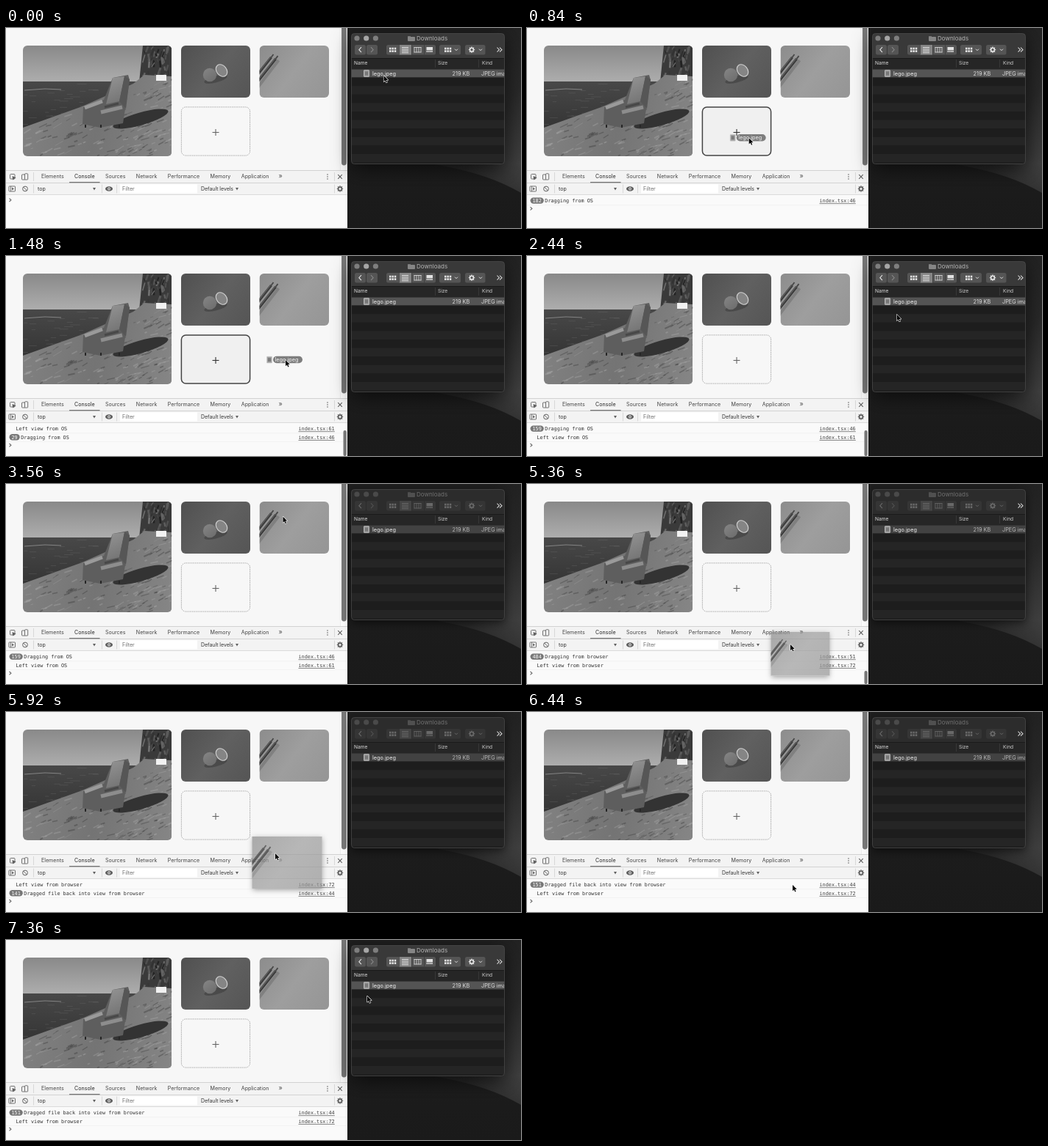
An HTML page with a canvas that plays this animation: 700 by 273 pixels, repeating every 7480 ms.

```html
<!DOCTYPE html>
<html lang="en">
<head>
<meta charset="utf-8">
<title>Drag and drop demo</title>
<style>
html, body { margin: 0; width: 100%; height: 100%; overflow: hidden; background: #f7f7f7; }
canvas { display: block; width: 700px; height: 273px; }
</style>
</head>
<body>
<canvas id="stage"></canvas>
<script>
const LOOP = 7480, STEP = 40, RATE = 0.414;
const UI = 'Inter, Roboto, sans-serif';
const MONO = '"DejaVu Sans Mono", monospace';
const canvas = document.getElementById('stage');
const c = canvas.getContext('2d');
const dpr = window.devicePixelRatio || 1;
canvas.width = 700 * dpr;
canvas.height = 273 * dpr;

// Pointer stops: time, x, y
const path = [
  [0, 513.5, 65], [80, 513, 62.5], [240, 513, 62.5], [600, 310, 142],
  [1000, 300, 152], [1300, 524, 88], [1480, 380, 142], [1640, 340, 140],
  [1960, 530, 72], [2480, 499, 80], [3080, 374, 52], [3520, 376.5, 44.5],
  [3640, 376.5, 44.5], [4040, 352, 150], [4200, 384, 105], [4400, 363.5, 117.5],
  [5120, 358, 219], [5360, 358, 219], [5740, 372, 119], [5920, 366, 193],
  [6280, 361, 236], [6640, 361, 236], [7280, 491, 76.5], [LOOP, 491, 76.5]
];

// Drag phases in time order
const OS_IN = 400, OS_OUT = 1200, OS_BACK = 1410, OS_GONE = 1794;
const GRAB = 3680, LEAVE = 4861, RETURN = 5579, EXIT = 5944, DROP = 6440;

// Console entries; those with an end time count up until then
const logs = [
  { at: OS_IN, end: OS_OUT, text: 'Dragging from OS', line: 46 },
  { at: OS_OUT, text: 'Left view from OS', line: 61 },
  { at: OS_BACK, end: OS_GONE, text: 'Dragging from OS', line: 46 },
  { at: OS_GONE, text: 'Left view from OS', line: 61 },
  { at: GRAB, text: 'Drag started from browser', line: 32 },
  { at: GRAB + 12, end: LEAVE, text: 'Dragging from browser', line: 51 },
  { at: LEAVE, text: 'Left view from browser', line: 72 },
  { at: RETURN, end: EXIT, text: 'Dragged file back into view from browser', line: 44 },
  { at: EXIT, text: 'Left view from browser', line: 72 }
];

const between = (t, a, b) => t >= a && t < b;

function slope(i, k) {
  if (i < 1 || i > path.length - 2) return 0;
  const [p, q, r] = [path[i - 1], path[i], path[i + 1]];
  const a = (q[k] - p[k]) / (q[0] - p[0]), b = (r[k] - q[k]) / (r[0] - q[0]);
  return a * b > 0 ? 2 * a * b / (a + b) : 0;
}

// Smooth path that never overshoots a stop
function pointer(t) {
  let i = 0;
  while (i < path.length - 2 && t >= path[i + 1][0]) i++;
  const a = path[i], b = path[i + 1], h = b[0] - a[0], u = (t - a[0]) / h, v = 1 - u;
  return [1, 2].map(k => a[k] * (1 + 2 * u) * v * v + b[k] * u * u * (3 - 2 * u) +
    h * u * v * (slope(i, k) * v - slope(i + 1, k) * u));
}

function seeded(seed) {
  return () => (seed = seed * 16807 % 2147483647) / 2147483647;
}

function paint(fill, stroke, width = 1) {
  if (fill) { c.fillStyle = fill; c.fill(); }
  if (stroke) { c.strokeStyle = stroke; c.lineWidth = width; c.stroke(); }
}

function rect(x, y, w, h, fill) {
  c.fillStyle = fill;
  c.fillRect(x, y, w, h);
}

function round(x, y, w, h, r, fill, stroke, width) {
  c.beginPath();
  c.roundRect(x, y, w, h, r);
  paint(fill, stroke, width);
}

function oval(x, y, rx, ry, angle, fill, stroke, width) {
  c.beginPath();
  c.ellipse(x, y, rx, ry, angle, 0, 7);
  paint(fill, stroke, width);
}

const dot = (x, y, r, fill) => oval(x, y, r, r, 0, fill);
const ring = (x, y, r, color, width) => oval(x, y, r, r, 0, null, color, width);

function trace(pts) {
  c.beginPath();
  for (let i = 0; i < pts.length; i += 2) c.lineTo(pts[i], pts[i + 1]);
}

function poly(pts, fill) {
  trace(pts);
  paint(fill);
}

function line(pts, color, width = 1) {
  trace(pts);
  paint(null, color, width);
}

function chevron(x, y, w, h, color) {
  line([x - w, y - h, x + w, y, x - w, y + h], color, 1.1);
}

function caret(x, y, color) {
  poly([x - 2, y - 1.7, x + 2, y - 1.7, x, y + 1.8], color);
}

function text(s, x, y, color, size = 7.1, font = UI, weight = 400) {
  c.font = `${weight} ${size}px ${font}`;
  c.fillStyle = color;
  c.fillText(s, x, y);
}

const mono = (s, x, y, color) => text(s, x, y, color, 6.82, MONO);

function grad(x0, y0, x1, y1, ...stops) {
  const g = c.createLinearGradient(x0, y0, x1, y1);
  stops.forEach((s, i) => g.addColorStop(i / (stops.length - 1), s));
  return g;
}

function clipped(x, y, w, h, r, draw) {
  c.save();
  c.beginPath();
  c.roundRect(x, y, w, h, r);
  c.clip();
  c.translate(x, y);
  draw();
  c.restore();
}

function gear(x, y, color) {
  ring(x, y, 2.4, color, 1.6);
  for (let a = 0; a < 6; a += Math.PI / 4) {
    const p = Math.cos(a), q = Math.sin(a);
    line([x + p * 2.8, y + q * 2.8, x + p * 4.2, y + q * 4.2], color, 1.3);
  }
}

function seaside() {
  const rnd = seeded(7);
  const shore = x => 112 - x * 0.36;
  rect(0, 0, 202, 50, grad(0, 0, 0, 50, '#898989', '#aeaeae'));
  rect(0, 49, 202, 70, grad(0, 49, 0, 115, '#484848', '#343434'));
  for (let i = 0; i < 60; i++)
    rect(rnd() * 150, 52 + rnd() * 60, 4 + rnd() * 10, 0.7, 'rgba(130,130,130,.3)');
  line([2, 61, 30, 59, 52, 60], '#8c8c8c', 0.9);
  poly([163, 0, 202, 0, 202, 60, 158, 50], '#3a3a3a');
  for (let i = 0; i < 50; i++) {
    const x = 163 + rnd() * 36, y = rnd() * 48, g = 30 + rnd() * 85;
    line([x, y, x + 2 - rnd() * 6, y + 3 + rnd() * 8], `rgb(${g},${g},${g})`, 1 + rnd() * 2);
  }
  // rocky ground
  poly([0, shore(0), 80, shore(80), 150, 52, 165, 40, 202, 42, 202, 151, 0, 151],
    grad(0, 90, 202, 130, '#818181', '#747474', '#858585'));
  for (let i = 0; i < 260; i++) {
    const x = rnd() * 202, y = shore(x) + 4 + rnd() * 100, w = 3 + rnd() * 9;
    const shade = rnd() < 0.55 ? '45,45,45' : '175,175,175';
    line([x, y, x + w, y - w * (0.2 + rnd() * 0.5)], `rgba(${shade},.33)`, 0.6 + rnd() * 1.5);
  }
  rect(181, 40, 14, 8, '#f1f1f1');
  // armchair and its shadow
  oval(160, 100, 39, 8.5, -0.28, '#333');
  poly([122, 44, 143, 40, 145, 47, 136, 106, 105, 112, 81, 107, 82, 84, 110, 74], '#5e5e5e');
  poly([122, 44, 138, 42, 131, 76, 113, 80], grad(118, 42, 134, 80, '#939393', '#727272'));
  poly([138, 42, 145, 46, 140, 86, 131, 76], '#565656');
  line([84, 85, 108, 76], '#9a9a9a', 5);
  line([106, 91, 135, 84], '#8d8d8d', 5);
  line([111, 84, 130, 79], '#484848', 3);
  for (const x of [84, 105, 130]) rect(x, 108, 2, 4, '#262626');
}

function fruit() {
  rect(0, 0, 94, 71, grad(0, 0, 94, 71, '#505050', '#606060', '#555'));
  oval(47, 46, 16, 4.5, -0.25, 'rgba(55,55,55,.5)');
  dot(39, 40, 9.2, grad(32, 30, 46, 50, '#858585', '#6c6c6c'));
  oval(55, 34, 9, 6.8, 0.9, '#858585', '#cfcfcf', 1.2);
}

function pencils() {
  rect(0, 0, 95, 71, grad(0, 0, 95, 71, '#8c8c8c', '#9e9e9e', '#959595'));
  line([-3, 58, 26, 20], 'rgba(60,60,60,.25)', 4);
  for (const x of [0, 6]) {
    const y = x * 0.35;
    line([x - 14, 54 + y, x + 16, 16 + y], '#3c3c3c', 3.5);
    line([x - 14, 53 + y, x + 15, 16 + y], '#727272', 0.9);
    line([x + 16, 16 + y, x + 19, 12 + y], '#484848', 1.8);
  }
}

function page(t) {
  rect(0, 0, 464, 195, '#f7f7f7');
  clipped(23, 24, 202.5, 151, 6, seaside);
  clipped(238, 24, 94, 71, 6, fruit);
  clipped(344.5, 24, 94.5, 71, 6, pencils);
  const hot = between(t, OS_IN, OS_OUT) || between(t, OS_BACK, OS_GONE);
  c.setLineDash(hot ? [] : [1.5, 1]);
  round(238.4, 107.9, 93.2, 66.2, 6, hot ? '#f0f0f0' : '#f7f7f7', hot ? '#444' : '#a0a0a0', hot ? 1.5 : 0.9);
  c.setLineDash([]);
  const ink = hot ? '#333' : '#666';
  line([280.5, 142.5, 289.5, 142.5], ink, 1.1);
  line([285, 138, 285, 147], ink, 1.1);
  rect(454, 0, 10, 195, '#fafafa');
  rect(454, 0, 0.6, 195, '#e3e3e3');
  round(456, -5, 6.8, 192.5, 3.4, '#777');
}

function toolbars() {
  const ink = '#606060';
  rect(0, 194, 464, 34, '#f3f3f3');
  for (const y of [194, 211, 227]) rect(0, y, 464, 0.8, '#cbcbcb');
  round(5.5, 199.5, 6.5, 6.5, 1, null, ink, 0.9);
  poly([8.5, 202, 13.5, 204.2, 9.2, 207.5], ink);
  round(21.5, 200, 5, 7, 0.8, null, ink, 0.9);
  round(25.5, 198.8, 4.2, 8.2, 0.8, '#f3f3f3', ink, 0.9);
  for (const x of [37, 446]) for (const y of [197, 213.5]) rect(x, y, 0.7, 12, '#ccc');
  for (const x of [130, 150]) rect(x, 213.5, 0.7, 12, '#ccc');

  // tabs sit a fixed gap apart
  let x = 48;
  for (const s of ['Elements', 'Console', 'Sources', 'Network', 'Performance', 'Memory', 'Application']) {
    const on = s === 'Console';
    text(s, x, 205.2, on ? '#222' : '#444');
    const w = c.measureText(s).width;
    if (on) rect(x - 7, 210, w + 14, 1.3, '#777');
    x += w + 14.4;
  }
  text('»', 370.5, 205.4, '#555', 9);
  for (const y of [200, 203, 206]) dot(437, y, 0.8, ink);
  for (const s of [-2.8, 2.8]) line([451.2, 203 - s, 456.8, 203 + s], ink, 1.1);

  round(4, 216, 8.5, 7, 0.7, null, ink, 0.9);
  rect(6, 216, 0.8, 7, ink);
  poly([8, 217.5, 11, 219.5, 8, 221.5], ink);
  ring(26, 219.5, 3.4, ink);
  line([23.6, 217.1, 28.4, 221.9], ink);
  text('top', 43, 222, '#333');
  caret(120, 219.6, ink);
  oval(140, 219.5, 5, 3.2, 0, ink);
  ring(140, 219.5, 1.5, '#f3f3f3');
  rect(155, 213.5, 105, 12, '#fff');
  text('Filter', 158, 222, '#707070');
  text('Default levels', 265, 222, '#333', 6.9);
  caret(314, 219.6, ink);
  gear(454, 219.5, ink);
}

function consolePane(t) {
  rect(0, 227.8, 464, 46, '#fafafa');
  let y = 238.2;
  for (const row of logs.filter(l => t >= l.at).slice(-2)) {
    const n = row.end ? Math.round((Math.min(t, row.end) - row.at) * RATE) : 1;
    let x = 13.5;
    if (n > 1) {
      const w = String(n).length * 4.1 + 6;
      round(4.5, y - 6.8, w, 8.4, 4.2, '#777');
      mono(n, 7.5, y, '#fff');
      x = 6 + w;
    }
    mono(row.text, x, y, '#303030');
    mono('index.tsx:' + row.line, 397.5, y, '#444');
    rect(397.5, y + 1.2, 49.3, 0.7, '#555');
    rect(0, y + 3.4, 464, 0.6, '#ececec');
    y += 11.7;
  }
  chevron(5.7, y - 3.4, 1.2, 2.2, '#666');
  const top = between(t, OS_BACK, 2600) ? 238 : between(t, LEAVE, 5760) ? 255 : 273;
  if (top < 273) round(458.5, top, 4.3, 273 - top, 2.1, '#777');
}

function desktop() {
  rect(464, 0, 236, 273, '#1c1c1c');
  c.beginPath();
  c.moveTo(464, 0);
  c.lineTo(464, 172);
  c.bezierCurveTo(560, 180, 640, 190, 700, 225);
  c.lineTo(700, 0);
  paint(grad(590, 110, 715, 190, '#1e1e1e', '#272727', '#454545'));
  rect(464, 185, 236, 88, grad(464, 185, 464, 273, 'rgba(26,26,26,0)', '#1a1a1a'));
}

function tileGrid(x, ink) {
  for (let i = 0; i < 6; i++) rect(x + i % 3 * 3.4, i > 2 ? 30.3 : 26.7, 2.5, 2.7, ink);
}

function viewIcons(ink) {
  tileGrid(521, ink);
  tileGrid(596, ink);
  for (let i = 0; i < 4; i++) {
    rect(538, 26 + i * 2.4, 9, 1, ink);
    rect(571.5 + i * 2.2, 31.3, 1.7, 1.7, ink);
    rect(554.6 + i * 3, 26, 0.8, 7.4, ink);
  }
  for (const y of [26, 32.6]) rect(554.6, y, 9.8, 0.8, ink);
  rect(571.5, 26, 8.5, 4.4, ink);
  gear(633, 29.7, ink);
  for (const x of [612, 645]) line([x - 2, 28.7, x, 30.7, x + 2, 28.7], ink);
}

function finder(active) {
  const ink = active ? '#e2e2e2' : '#686868', dim = active ? '#858585' : '#505050';
  const button = active ? '#555' : '#353535', bar = active ? '#393939' : '#2c2c2c';
  const value = active ? '#ddd' : '#b8b8b8';
  c.save();
  c.shadowColor = 'rgba(0,0,0,.55)';
  c.shadowBlur = (active ? 26 : 12) * dpr;
  c.shadowOffsetY = (active ? 8 : 4) * dpr;
  round(469.5, 7.5, 208, 178, 4, '#202020');
  c.restore();
  clipped(469.5, 7.5, 208, 178, 4, () => {
    c.translate(-469.5, -7.5);
    rect(469, 7, 210, 35, bar);
    rect(469, 41, 210, 15, '#262626');
    rect(469, 41, 210, 0.8, '#171717');
    for (let i = 0; i < 12; i++) rect(469, 56 + i * 11.6, 210, 11.6, i % 2 ? '#1d1d1d' : '#252525');
    rect(469, 56.5, 210, 10.8, active ? '#545454' : '#424242');
    for (let i = 0; i < 3; i++)
      dot(477 + i * 12.7, 14, 3.6, !active ? '#4a4a4a' : i === 1 ? '#a6a6a6' : '#7e7e7e');
    rect(546, 11.2, 4, 2, dim);
    round(546, 12, 10, 6, 1, dim);
    text('Downloads', 558, 16.8, active ? '#b4b4b4' : '#707070', 8);
    for (const [x, w] of [[474, 15], [490, 15], [517, 67], [589, 29], [624, 27.5]])
      round(x, 23, w, 13.5, 2.5, button);
    rect(534, 23, 17, 13.5, active ? '#858585' : '#444');
    for (const x of [534, 551, 568]) rect(x, 23, 0.7, 13.5, bar);
    chevron(481.4, 29.7, -1.6, 3.5, ink);
    chevron(497.6, 29.7, 1.6, 3.5, dim);
    viewIcons(ink);
    for (const x of [669, 672.5]) chevron(x, 29.7, 1.5, 3, '#d2d2d2');
    text('Name', 473, 50.4, '#ddd', 6.6);
    text('Size', 587, 50.4, '#ccc', 6.6);
    text('Kind', 647, 50.4, '#ccc', 6.6);
    for (const x of [583, 642]) rect(x, 43, 0.6, 11, '#444');
    fileIcon(486.5, 57.6);
    text('lego.jpeg', 498, 64.6, '#eee', 7.3);
    text('219 KB', 606.5, 64.6, value, 7.3);
    text('JPEG image', 646, 64.6, value, 7.3);
  });
  round(469.5, 7.5, 208, 178, 4, null, '#505050', 0.7);
}

function fileIcon(x, y) {
  round(x, y, 7, 8.8, 0.5, '#999', '#ccc', 0.7);
  rect(x + 1.5, y + 2, 4, 4.8, '#777');
}

function fileGhost(x, y) {
  c.globalAlpha = 0.9;
  fileIcon(x - 25.5, y - 4.8);
  round(x - 17, y - 5.2, 40, 9.4, 4.7, '#727272');
  text('lego.jpeg', x - 14.5, y + 2.2, '#fff', 7.3);
  c.globalAlpha = 1;
}

function photoGhost(x, y, t) {
  const out = between(t, LEAVE, RETURN) || t >= EXIT;
  const k = out ? 0.84 : 1;
  const dy = out ? 17 : t < LEAVE ? 15.5 : 23;
  c.save();
  c.translate(x - 31.5 * k, y - dy);
  c.scale(k, k);
  c.save();
  c.beginPath();
  c.rect(-15, -15, 125, 110);
  c.rect(0, 0, 95, 71);
  c.clip('evenodd');
  c.shadowColor = 'rgba(0,0,0,.35)';
  c.shadowBlur = 7 * dpr;
  c.shadowOffsetY = 2 * dpr;
  rect(0, 0, 95, 71, '#999');
  c.restore();
  c.globalAlpha = 0.72;
  clipped(0, 0, 95, 71, 0, pencils);
  c.restore();
}

function arrow(x, y) {
  c.save();
  c.translate(x, y);
  c.scale(0.92, 0.92);
  c.lineJoin = 'round';
  trace([0, 0, 0, 9, 2.1, 7.1, 3.6, 10.4, 5, 9.8, 3.5, 6.6, 6.3, 6.5]);
  c.closePath();
  paint(null, '#fff', 1.2);
  paint('#000');
  c.restore();
}

function frame(now) {
  const t = Math.floor(now % LOOP / STEP) * STEP;
  const [x, y] = pointer(t);
  c.setTransform(dpr, 0, 0, dpr, 0, 0);
  page(t);
  toolbars();
  consolePane(t);
  desktop();
  finder(!between(t, 2760, 7200));
  if (between(t, 320, 2000)) fileGhost(x, y);
  if (between(t, GRAB, DROP)) photoGhost(x, y, t);
  arrow(x, y);
}

const start = performance.now();
function tick() {
  frame(performance.now() - start);
  requestAnimationFrame(tick);
}
tick();
</script>
</body>
</html>
```
